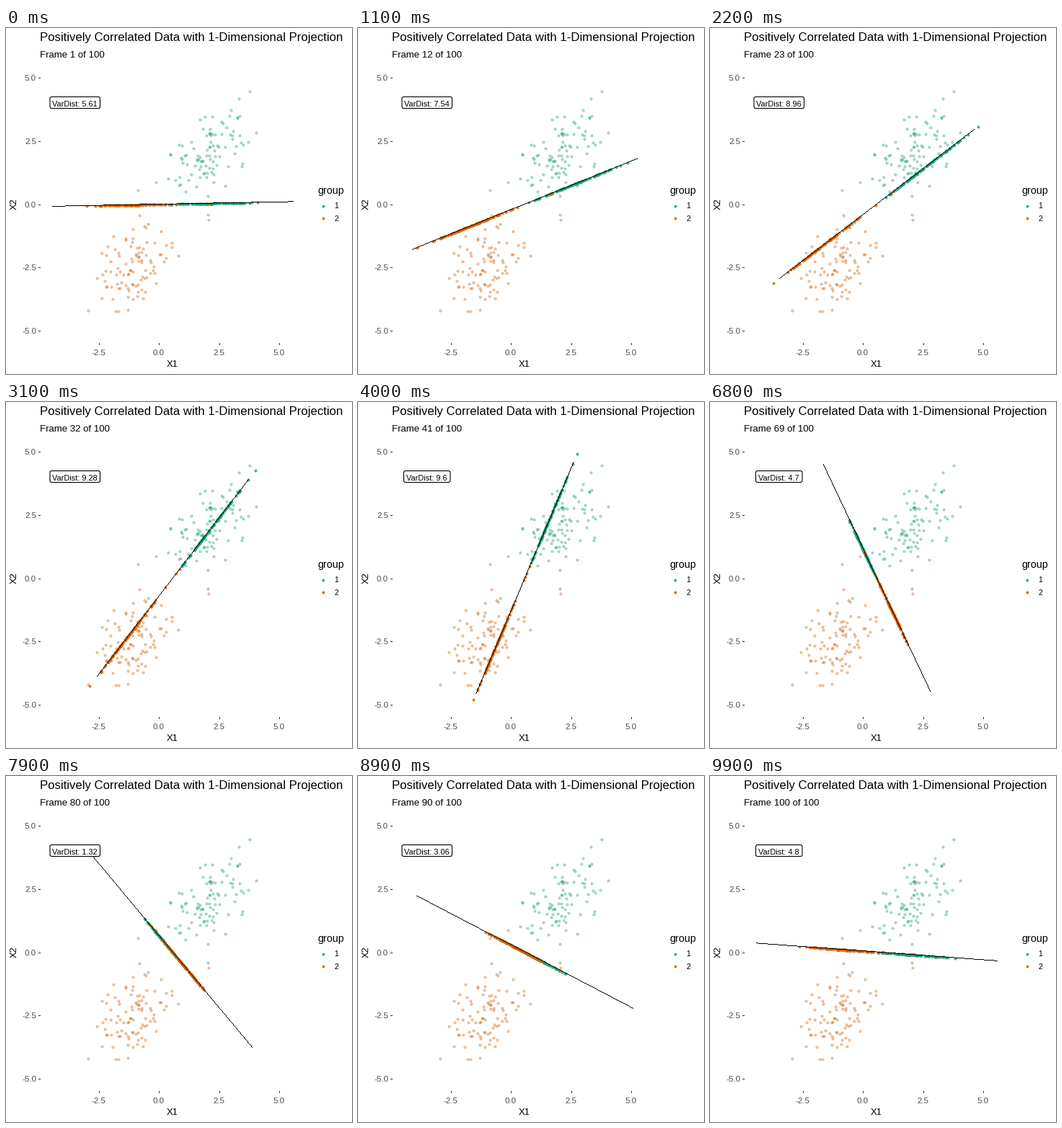
These frames come from a looping animation (480x480 px, 10000 ms). A matplotlib script:

```python
import numpy as np
import matplotlib.pyplot as plt
from matplotlib.animation import FuncAnimation
from matplotlib.colors import to_rgba
from matplotlib.patches import FancyBboxPatch

plt.rcParams["font.family"] = "Liberation Sans"

SIZE, FRAMES = 480, 100
ORIGIN = np.array([212, 244.6])       # data origin in pixels
SCALE = np.array([33.4, -35.15])      # pixels per data unit
CENTRE = np.array([0.57, 0.0])
GREEN, ORANGE, GREY = "#1B9E77", "#D95F02", "#4D4D4D"

# Step, line angle in degrees and label value; linear in between
STEPS, ANGLES, VALUES = np.transpose([
    (1, 1.06, 5.61), (12, 21, 7.54), (23, 36, 8.96), (41, 66.1, 9.6),
    (51, 86, 8.9), (69, 116.4, 4.7), (80, 131.3, 1.32), (100, 176, 4.8)])

rng = np.random.default_rng(7)


def to_px(p):
    return ORIGIN + np.asarray(p) * SCALE


def cluster(mean, sd, corr, outliers, count=100, reach=2.1):
    """Correlated normal cloud without its far tail, plus a few outliers."""
    z = rng.standard_normal((2 * count, 2))
    z = z[np.hypot(*z.T) < reach][:count - len(outliers)]
    z[:, 1] = corr * z[:, 0] + np.sqrt(1 - corr ** 2) * z[:, 1]
    return np.vstack([mean + z * sd, outliers])


groups = [
    (cluster((2.15, 2.2), (0.95, 1.05), 0.5,
             [(3.77, 4.45), (4.04, 2.83), (2.04, -0.41), (-0.45, -0.78)]), GREEN),
    (cluster((-1.05, -2.15), (0.85, 1.0), 0.4,
             [(-2.93, -4.19), (-1.68, -4.22), (-0.87, 0.56), (-0.12, 0.87),
              (2.07, -0.61), (0.81, -2.03)]), ORANGE),
]

fig = plt.figure(figsize=(4.8, 4.8), dpi=100, facecolor="white")
ax = fig.add_axes([0, 0, 1, 1])
ax.set_xlim(0, SIZE)
ax.set_ylim(SIZE, 0)
ax.axis("off")


def text(x, y, s, px, color="black", ha="center", va="center", **kw):
    return ax.text(x, y, s, fontsize=px * 0.72, color=color, ha=ha, va=va, **kw)


def dots(px, color, face, edge, z):
    return ax.plot(*np.transpose(px), "o", ms=3 * 0.72, mew=0.72, zorder=z,
                   mfc=to_rgba(color, face), mec=to_rgba(color, edge))[0]


def tick(xs, ys):
    ax.plot(xs, ys, color="#333333", lw=0.72)


def pixel_line(a, b):
    """One point per pixel along the longer side, for a hard thin line."""
    return np.linspace(a, b, int(np.abs(b - a).max()) + 1).T


text(47, 18, "Positively Correlated Data with 1-Dimensional Projection", 16.8,
     ha="left", va="baseline")
subtitle = text(47, 41, "", 13.3, ha="left", va="baseline")
text(231, 467, "X1", 13)
text(12, 244, "X2", 13, rotation=90)

for v in (-5, -2.5, 0, 2.5, 5):
    x, y = to_px((v, v))
    text(42, y, f"{v:.1f}", 11.5, GREY, ha="right", va="center_baseline")
    tick([45, 47], [y, y])
    if v > -5:
        text(x, 450.5, f"{v:.1f}", 11.5, GREY)
        tick([x, x], [437, 439])

text(432, 230, "group", 14.2, ha="left", va="baseline")
for name, color, y in (("1", GREEN, 247), ("2", ORANGE, 264)):
    dots([(440, y)], color, 0.8, 0.8, 2)
    text(458, y + 0.5, name, 10.5)

for pts, color in groups:
    dots(to_px(pts), color, 0.25, 0.45, 2)
shadows = [dots([(0, 0)], color, 0.75, 0.8, 3) for _, color in groups]
line, = ax.plot([], [], "k,", zorder=4)

box = FancyBboxPatch((0, 0), 1, 1, boxstyle="round,pad=0,rounding_size=2.5",
                     fc="white", ec="black", lw=0.8, zorder=5)
ax.add_patch(box)
label = text(95.3, 108.7, "", 11, va="baseline", zorder=6)


def update(i):
    n = i + 1
    angle = np.radians(np.interp(n, STEPS, ANGLES))
    axis = np.array([np.cos(angle), np.sin(angle)])

    line.set_data(*pixel_line(*to_px([CENTRE - 5 * axis, CENTRE + 5 * axis])))
    for (pts, _), shadow in zip(groups, shadows):
        along = (pts - CENTRE) @ axis
        shadow.set_data(*to_px(CENTRE + np.outer(along, axis)).T)

    value = f"{round(np.interp(n, STEPS, VALUES), 2):g}"
    label.set_text("VarDist: " + value)
    half = 34.75 if len(value) > 3 else 32.25
    box.set_bounds(95.75 - half, 95.5, 2 * half, 16)
    subtitle.set_text(f"Frame {n} of {FRAMES}")
    return [line, *shadows, box, label, subtitle]


anim = FuncAnimation(fig, update, frames=FRAMES, interval=100,
                     repeat=True, repeat_delay=0)
plt.show()
```
